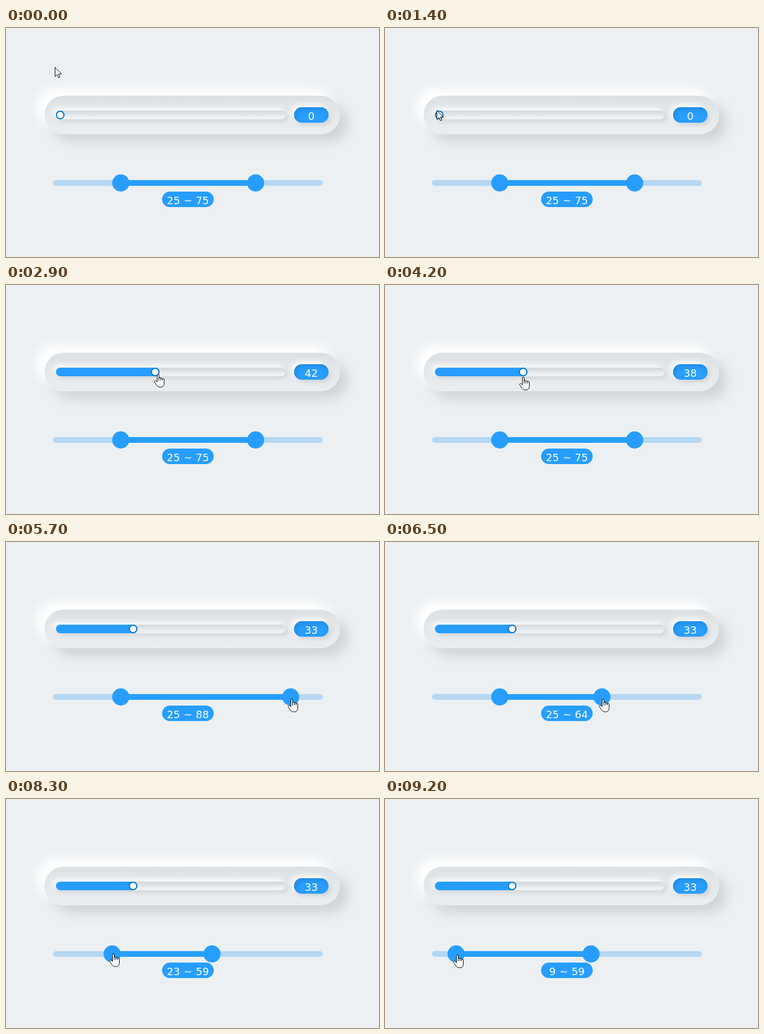
Animation of 650x399 px, one loop 9.3 s. Source, as an HTML page:

```html
<!DOCTYPE html>
<html lang="en">
<head>
<meta charset="utf-8">
<title>Range sliders</title>
<style>
  html, body { margin: 0; width: 100%; height: 100%; overflow: hidden; background: #ecf0f3; }
  div, svg { position: absolute; }
  svg { left: 0; top: 0; }
  .panel {
    left: 67px; top: 118px; width: 515px; height: 67px; border-radius: 34px;
    background: linear-gradient(#dde0e3, #e5e8eb 45%, #ebeef1);
    box-shadow: -14px -14px 20px #fff, 14px 14px 20px #d1d4d6;
  }
  .track {
    left: 87px; top: 144px; width: 400px; height: 15px; border-radius: 8px;
    background: linear-gradient(#d5d8da, #e0e3e5 40%, #eef1f3 75%);
    box-shadow: -5px -5px 8px #f8fafb, 4px 4px 6px #d3d6d8;
  }
  .badge {
    left: 502px; top: 138px; width: 60px; height: 27px; border-radius: 14px;
    background: #2a9fff;
    box-shadow: -5px -5px 8px #f8fafb, 4px 4px 6px #d0d3d6, inset 3px 4px 10px #208ae0;
  }
  text { font: 18px "DejaVu Sans", sans-serif; word-spacing: .5px; fill: #fff; text-anchor: middle; }
  .blue { fill: #279eff; }
  .cursor { fill: #fff; stroke: #000; stroke-linejoin: round; }
</style>
</head>
<body>
<div class="panel"></div>
<div class="track"></div>
<div class="badge"></div>
<svg width="650" height="399" viewBox="0 0 650 399">
  <rect id="fill" class="blue" x="87" y="144" height="15" rx="7.5"/>
  <circle id="knob" cy="151.5" r="6.5" fill="#fff" stroke="#0876cc" stroke-width="2"/>
  <text id="value" x="532" y="160"></text>

  <rect x="82" y="265" width="470" height="10" rx="5" fill="#b5d7f3"/>
  <rect id="span" class="blue" y="265" height="10"/>
  <circle id="lowKnob" class="blue" cy="270" r="15"/>
  <circle id="highKnob" class="blue" cy="270" r="15"/>
  <rect class="blue" x="272" y="285" width="90" height="27" rx="13.5"/>
  <text id="range" x="317" y="307"></text>

  <path id="arrow" class="cursor" d="M.5 .5V16.5L4.2 13.2 6.5 18.5 9 17.4 6.7 12.2H11.7Z"/>
  <g id="hand" class="cursor">
    <path d="M-.5 14V2A1.5 1.5 0 0 1 2.5 2V7.5A1.5 1.3 0 0 1 5.5 7.5V8.5A1.5 1.3 0 0 1 8.5 8.5V9.5A1.5 1.3 0 0 1 11.5 9.7V16C11.5 20 9.5 23 5.5 23C1 23-1 21-2.5 18L-5.2 14C-6 12-4 10.8-2.5 12.2Z"/>
    <path fill="none" d="M2.5 7V11.5M5.5 8V11.5M8.5 9V11.5"/>
  </g>
</svg>
<script>
const LOOP = 9300, STEP = 100, TEXT_LAG = 20;

const el = Object.fromEntries([...document.querySelectorAll("[id]")].map(e => [e.id, e]));
const set = (e, attrs) => { for (const k in attrs) e.setAttribute(k, attrs[k]); };

const progress = (t, from, to) => Math.min(1, Math.max(0, (t - from) / (to - from)));
const smooth = u => u * u * (3 - 2 * u);
const glide = (t, from, to, amount) => amount * smooth(progress(t, from, to));
const mix = (a, b, u) => a.map((v, i) => v + (b[i] - v) * u);

// Slider values: each drag adds its share.
const single = t => Math.round(glide(t, 1400, 3300, 48.4) - 15.4 * progress(t, 3400, 4400) ** 1.7);
const high = t => Math.round(75 + glide(t, 5320, 5800, 15) - glide(t, 5800, 6700, 31));
const low = t => Math.round(25 + glide(t, 7070, 7800, 28) - glide(t, 7800, 8400, 33) - glide(t, 8400, 9200, 11));

const singleX = t => 94.5 + 3.85 * single(t);
const rangeX = value => Math.round(82 + 4.7 * value);

function pointerAt(t) {
  const onSingle = [
    singleX(t) + 4 - glide(t, 3400, 4200, 5),
    143 + glide(t, 1400, 2900, 12) + glide(t, 2900, 4200, 5)
  ];
  const onHigh = [rangeX(high(t)) + 1, 273];
  const onLow = [rangeX(low(t)) + 1, 266 + glide(t, 7400, 9200, 5)];

  if (t <= 1400) return mix([85, 68], [90, 143], progress(t, 300, 1400));
  if (t <= 4400) return onSingle;
  if (t <= 6700) return mix(onSingle, onHigh, smooth(progress(t, 4400, 5300)));
  return mix(onHigh, onLow, smooth(progress(t, 6700, 7100)));
}

function draw(t) {
  const knobX = singleX(t), lowX = rangeX(low(t)), highX = rangeX(high(t));
  set(el.fill, { width: knobX + 7.5 - 87 });
  set(el.knob, { cx: knobX });
  set(el.lowKnob, { cx: lowX });
  set(el.highKnob, { cx: highX });
  set(el.span, { x: lowX, width: highX - lowX });

  const shown = t - TEXT_LAG;
  el.value.textContent = single(shown);
  el.range.textContent = `${low(shown)} ~ ${high(shown)}`;

  const [x, y] = pointerAt(t).map(Math.round);
  const over = (cx, cy, r) => Math.hypot(x - cx, y - cy) < r;
  const hovering = over(knobX, 151.5, 9) || over(lowX, 270, 15) || over(highX, 270, 15);
  const transform = `translate(${x} ${y})`;
  set(el.arrow, { transform, visibility: hovering ? "hidden" : "visible" });
  set(el.hand, { transform, visibility: hovering ? "visible" : "hidden" });
}

function tick() {
  draw(Math.floor(performance.now() % LOOP / STEP) * STEP);
  requestAnimationFrame(tick);
}
tick();
</script>
</body>
</html>
```
